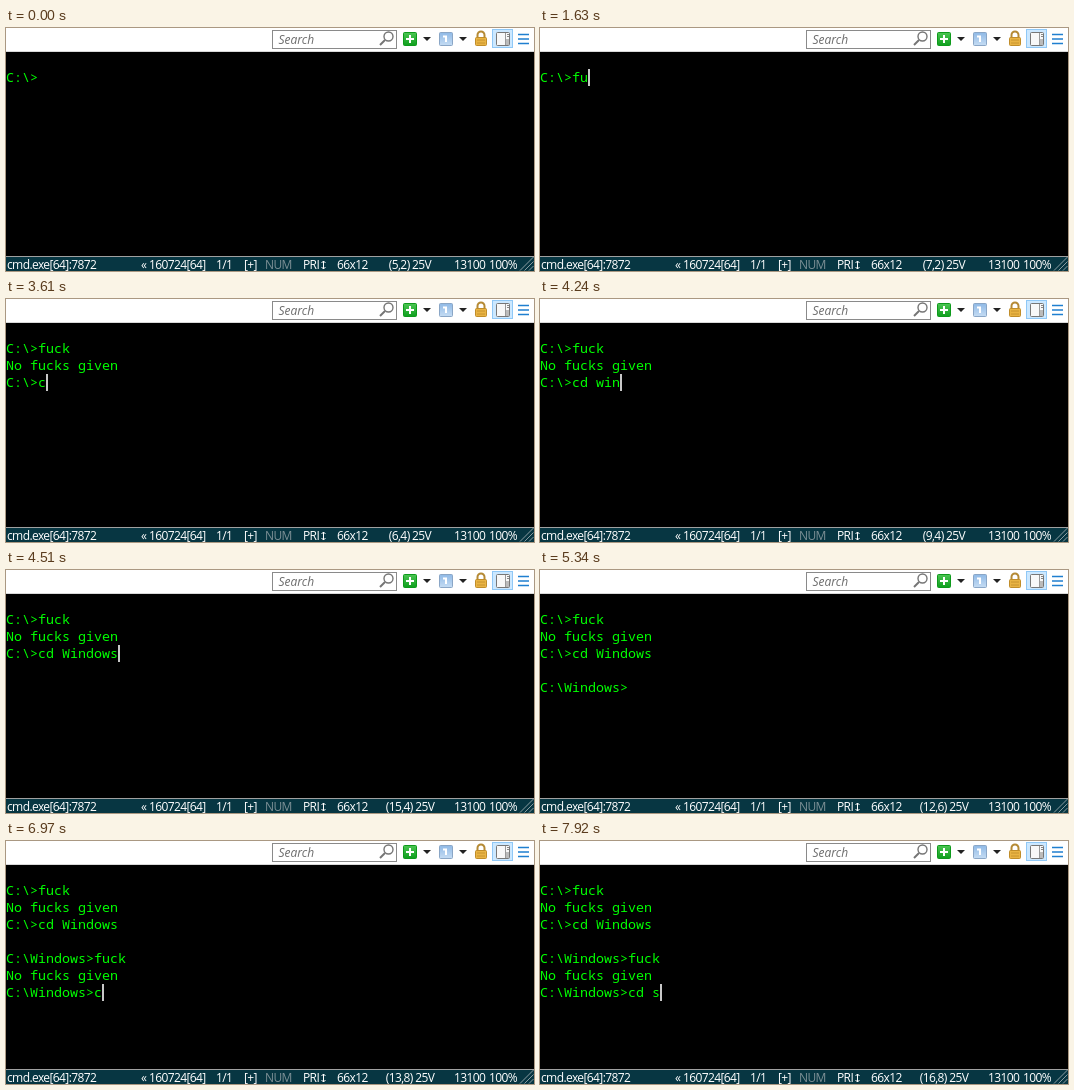
An HTML page that plays this animation: 528 px wide and 243 px high, repeating every 8000 ms.

```html
<!DOCTYPE html>
<html lang="en">
<head>
<meta charset="utf-8">
<title>Console session</title>
<style>
  html, body { margin: 0; width: 100%; height: 100%; overflow: hidden; background: #000; }
  svg { display: block; width: 528px; height: 243px; }
  #term { font: 13.3333px "Noto Sans Mono", monospace; fill: #0f0; }
  #status { font: 12px "Open Sans", sans-serif; letter-spacing: -.6px; fill: #fff; }
  #search { font: italic 12px "Open Sans", sans-serif; fill: #6d6d6d; }
</style>
</head>
<body>
<svg viewBox="0 0 528 243">
  <defs>
    <linearGradient id="green" x2="0" y2="1">
      <stop stop-color="#4cc653"/><stop offset="1" stop-color="#0f9f1e"/>
    </linearGradient>
    <linearGradient id="blue" x2="0" y2="1">
      <stop stop-color="#8fb9e6"/><stop offset="1" stop-color="#c5dcf3"/>
    </linearGradient>
  </defs>
  <rect width="528" height="243"/>

  <g id="toolbar">
    <rect width="528" height="24" fill="#fff"/>
    <rect y="23" width="528" height="1" fill="#d8d8d8"/>
    <rect x="266.5" y="2.5" width="124" height="18" fill="#fff" stroke="#8a8a8a"/>
    <text id="search" x="272.500" y="16">Search</text>
    <g fill="none" stroke="#757575">
      <circle cx="382.5" cy="8.5" r="4.5" stroke-width="1.4"/>
      <path d="M379 12L374 17" stroke-width="2"/>
    </g>

    <rect x="397.5" y="4.5" width="13" height="13" rx="1" fill="url(#green)" stroke="#0e9a1c"/>
    <path d="M404 7v8M400 11h8" stroke="#fff" stroke-width="2"/>
    <path id="arrow" d="M417 9h8l-4 4z" fill="#222"/>

    <rect x="433.5" y="4.5" width="13" height="13" rx="1" fill="url(#blue)" stroke="#8aa6c6"/>
    <path d="M437 8.5h4M440 8v6" stroke="#fff" stroke-width="2"/>
    <use href="#arrow" x="36"/>

    <path d="M471.500 10V7a3.500 3.500 0 0 1 7 0v3" fill="none" stroke="#b58a35" stroke-width="2"/>
    <rect x="469.5" y="9.5" width="11" height="8" rx="1" fill="#e9b444" stroke="#c08d2a"/>
    <path d="M471 12h8M471 15h8" stroke="#c8942e"/>

    <rect x="486.5" y="1.5" width="20" height="18" fill="#cce8ff" stroke="#90c8f6"/>
    <rect x="490.5" y="4.5" width="13" height="13" rx="1" fill="#f8f8f8" stroke="#777"/>
    <path d="M499.500 5v12" stroke="#999"/>
    <path d="M501 6.500h2M501 8.500h2" stroke="#888"/>
    <rect x="500" y="11" width="3" height="6" fill="#bbb"/>
    <path d="M512 6.500h11M512 11h11M512 15.500h11" stroke="#1f7fd0" stroke-width="1.600"/>
  </g>

  <g id="term"></g>
  <rect id="cursor" width="2" height="17" fill="#c8c8c8"/>

  <g id="status">
    <rect y="228" width="528" height="15" fill="#073642"/>
    <rect y="228" width="528" height="1" fill="#a0a0a0"/>
    <text x="1" y="241">cmd.exe[64]:7872</text>
    <text x="135" y="241">« 160724[64]</text>
    <text x="210" y="241">1/1</text>
    <text x="238" y="241">[+]</text>
    <text x="259" y="241" fill="#7d9096">NUM</text>
    <text x="297" y="241">PRI</text>
    <path d="M317.5 233v8M315.5 235l2-2 2 2M315.5 239l2 2 2-2" fill="none" stroke="#fff"/>
    <text x="331" y="241">66x12</text>
    <text id="pos" x="404" y="241" text-anchor="middle"></text>
    <text x="448" y="241">13100</text>
    <text x="483" y="241">100%</text>
    <path d="M514 242.5L527.5 229M518.5 242.5l9-9M523 242.5l4.5-4.5" stroke="#8a9ca1"/>
  </g>
</svg>
<script>
const LOOP = 8000, TOP = 41, ROW = 17, COL = 8;
const $ = id => document.getElementById(id);

const root = 'C:\\>', dir = 'C:\\Windows>', reply = 'fuck\nNo fucks given\n';
const first = root;
const second = first + reply + root;
const third = second + 'cd Windows\n\n' + dir;
const fourth = third + reply + dir;

// time, screen text, cursor visible, caret position in the status bar
const steps = [
  [0, first, 0, '5,2'],
  [120, first + 'f', 1, '6,2'],
  [670, first + 'f', 0, '6,2'],
  [1230, first + 'f', 1, '6,2'],
  [1630, first + 'fu', 1, '7,2'],
  [2000, first + 'fuc', 1, '7,2'],
  [2280, first + 'fuck', 1, '9,2'],
  [2560, second, 1, '9,2'],
  [3090, second, 0, '5,4'],
  [3610, second + 'c', 1, '6,4'],
  [3730, second + 'cd', 1, '6,4'],
  [3850, second + 'cd ', 1, '8,4'],
  [3970, second + 'cd w', 1, '8,4'],
  [4120, second + 'cd wi', 1, '9,4'],
  [4240, second + 'cd win', 1, '9,4'],
  [4390, second + 'cd Windows', 1, '12,4'],
  [4510, second + 'cd Windows', 1, '15,4'],
  [4790, third, 1, '15,4'],
  [5090, third, 1, '12,6'],
  [5340, third, 0, '12,6'],
  [5780, third + 'f', 1, '13,6'],
  [5900, third + 'fu', 1, '14,6'],
  [6040, third + 'fuck', 1, '14,6'],
  [6320, fourth, 1, '15,7'],
  [6850, fourth, 0, '12,8'],
  [6970, fourth + 'c', 1, '13,8'],
  [7120, fourth + 'cd', 1, '13,8'],
  [7250, fourth + 'cd ', 1, '13,8'],
  [7520, fourth + 'cd ', 1, '15,8'],
  [7770, fourth + 'cd s', 1, '15,8'],
  [7920, fourth + 'cd s', 1, '16,8']
];

const rows = Array.from({ length: 7 }, (_, i) => {
  const row = document.createElementNS('http://www.w3.org/2000/svg', 'text');
  row.setAttribute('y', TOP + ROW * i + 13);
  return $('term').appendChild(row);
});

function show([, screen, cursor, pos]) {
  const lines = screen.split('\n'), last = lines.length - 1;
  rows.forEach((row, i) => row.textContent = lines[i] || '');
  $('cursor').setAttribute('x', lines[last].length * COL);
  $('cursor').setAttribute('y', TOP + ROW * last);
  $('cursor').setAttribute('visibility', cursor ? 'visible' : 'hidden');
  $('pos').textContent = `(${pos}) 25V`;
}

let start, current;
function tick(now) {
  start ??= now;
  const t = (now - start) % LOOP;
  const step = steps.findLast(s => s[0] <= t) || steps[0];
  if (step !== current) show(current = step);
  requestAnimationFrame(tick);
}
show(current = steps[0]);
requestAnimationFrame(tick);
</script>
</body>
</html>
```
